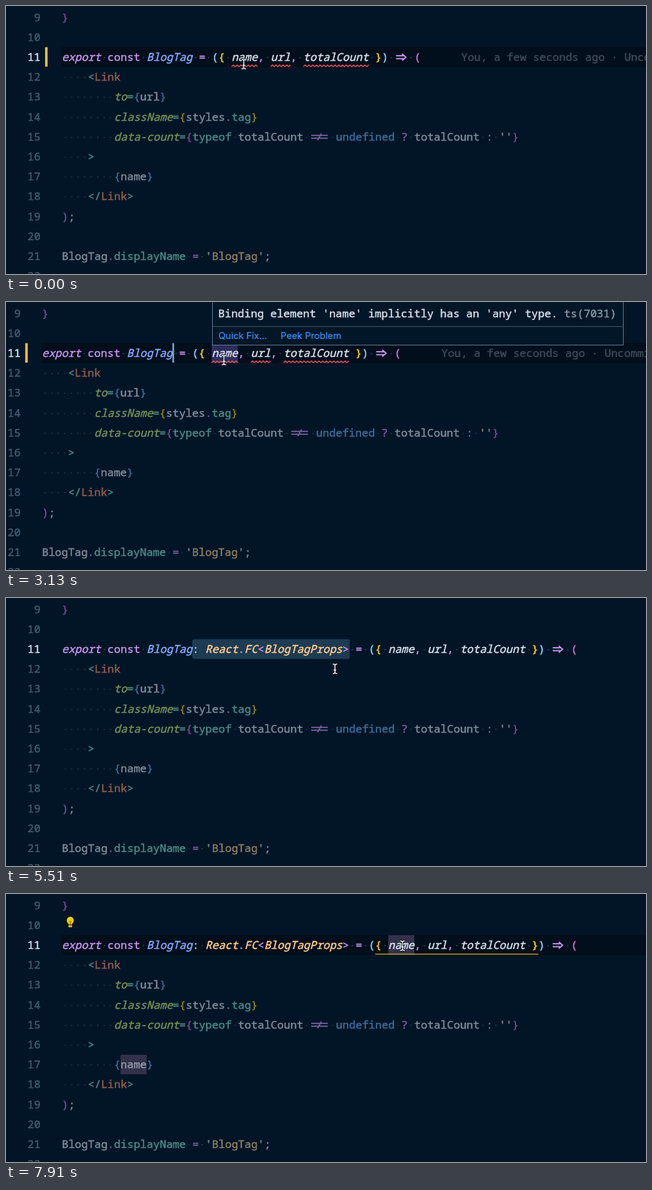
These frames come from a looping animation (1000x420 px, 8 s). An HTML page:

```html
<!DOCTYPE html>
<html lang="en">
<head>
<meta charset="utf-8">
<title>Typed component in an editor</title>
<style>
html, body { margin: 0; width: 100%; height: 100%; overflow: hidden; background: #011526; }
svg { display: block; width: 100vw; height: 100vh; }
text { font: 500 17px "Noto Sans Mono", "DejaVu Sans Mono", monospace; white-space: pre; stroke-width: 0.5; }
.it { font-style: italic; }
.ui { font: 400 14.5px Inter, Roboto, sans-serif; stroke-width: 0.2; }
.thin { stroke-width: 0.2; }
</style>
</head>
<body>
<svg id="stage" viewBox="0 0 1000 420"></svg>
<script>
const NS = 'http://www.w3.org/2000/svg';
const LOOP = 8000, CW = 10.2, LH = 31.2, X0 = 87.2;
const stage = document.getElementById('stage');

// Token keys: a capital letter means italic.
const colors = {
  k: '#c792ea', b: '#82aaff', w: '#d6deeb', y: '#ffd700', c: '#87d3ff', m: '#da70d6',
  t: '#7fdbca', g: '#c5e478', o: '#ffcb8b', r: '#f78c6c', s: '#ecc48d', u: '#6ea8e8'
};

const colX = col => X0 + col * CW;
const baseline = line => 86 + (line - 11) * LH;

function add(parent, tag, attrs = {}, text) {
  const el = document.createElementNS(NS, tag);
  for (const key in attrs) el.setAttribute(key, attrs[key]);
  if (text) el.textContent = text;
  parent.appendChild(el);
  return el;
}
const group = (parent, attrs) => add(parent, 'g', attrs);
const rect = (parent, x, y, width, height, fill, more) =>
  add(parent, 'rect', { x, y, width, height, fill, ...more });
const label = (parent, x, y, fill, text, more) =>
  add(parent, 'text', { x, y, fill, stroke: fill, ...more }, text);

function ligature(parent, x, y, kind, stroke) {
  const d = kind === '=>'
    ? `M${x + 2} ${y - 8}h12M${x + 2} ${y - 3.5}h12M${x + 11.5} ${y - 11}l6 5.2l-6 5.2`
    : `M${x + 2} ${y - 8}h26M${x + 2} ${y - 3.5}h26M${x + 18} ${y - 11}l-6 10.5`;
  add(parent, 'path', { d, stroke, fill: 'none', 'stroke-width': 2 });
}

// Lays tokens on the character grid; spaces become faint dots.
function code(parent, x, y, tokens, dot) {
  for (const token of tokens) {
    const key = token[0], text = token.slice(1), low = key.toLowerCase();
    if (key === ' ') {
      if (dot) label(parent, x, y, dot, '·'.repeat(text.length + 1), { class: 'thin' });
      x += (text.length + 1) * CW;
      continue;
    }
    if (text === '=>' || text === '!==') ligature(parent, x, y, text, colors[low]);
    else label(parent, x, y, colors[low], text, key === low ? {} : { class: 'it' });
    x += text.length * CW;
  }
  return x;
}

function squiggle(parent, col, len) {
  let d = `M${colX(col)} 95`;
  const steps = Math.round(len * CW / 2.9);
  for (let i = 0; i < steps; i++) d += `l${len * CW / steps} ${i % 2 ? 2.6 : -2.6}`;
  add(parent, 'path', { d, fill: 'none', stroke: '#ef5350', 'stroke-width': 1.5 });
}

const spaces = n => ' '.repeat(n);
const page = group(stage);

// Backgrounds
const lineBg = rect(page, 87, 64.5, 960, 31, '#010e1b');
const selection = rect(page, 291, 64.5, 246, 31, '#1d3b53', { rx: 3 });
const hoverPlain = rect(page, colX(26), 64.5, 4 * CW, 31, '#2d2d5d');
const hoverTyped = rect(page, colX(50), 64.5, 4 * CW, 31, '#2d2d5d');
const wordMarks = group(page);
rect(wordMarks, colX(50), 64.5, 4 * CW, 31, '#333149');
rect(wordMarks, colX(9), 252, 4 * CW, 30.5, '#333149');

// Line numbers
for (let n = 9; n <= 22; n++) {
  label(page, 54, baseline(n), n === 11 ? '#d5e6f5' : '#435a6e', n, { 'text-anchor': 'end' });
}

// Dimmed lines
const dimLines = {
  9: ['m}'],
  12: [spaces(4), 't<', 'rLink'],
  13: [spaces(8), 'Gto', 't=', 'u{', 'wurl', 'u}'],
  14: [spaces(8), 'GclassName', 't=', 'y{', 'wstyles', 'k.', 'ttag', 'y}'],
  15: [spaces(8), 'Gdata-count', 't=', 'm{', 'ttypeof', ' ', 'wtotalCount', ' ', 'k!==', ' ',
    'uundefined', ' ', 'k?', ' ', 'wtotalCount', ' ', 'k:', ' ', "w''", 'm}'],
  16: [spaces(4), 't>'],
  17: [spaces(8), 'u{', 'wname', 'u}'],
  18: [spaces(4), 't</', 'rLink', 't>'],
  19: ['m)', 'w;'],
  21: ['wBlogTag', 'k.', 'tdisplayName', ' ', 'k=', ' ', "w'", 'sBlogTag', "w'", 'w;']
};
const dim = group(page, { opacity: 0.58 });
for (const n in dimLines) code(dim, X0, baseline(+n), dimLines[n], '#28475f');

// Active line, without and with the type annotation
const head = ['Kexport', ' ', 'kconst', ' ', 'BBlogTag'];
const type = ['t:', ' ', 'OReact', 'k.', 'OFC', 'k<', 'OBlogTagProps', 'k>'];
const tail = [' ', 'k=', ' ', 'c(', 'y{', ' ', 'Wname', 'k,', ' ', 'Wurl', 'k,', ' ',
  'WtotalCount', ' ', 'y}', 'c)', ' ', 'k=>', ' ', 'm('];

function activeLine(tokens, shift) {
  const all = group(page);
  const end = code(all, X0, 86, tokens, '#25425a');
  const errors = group(all);
  squiggle(errors, 26 + shift, 4);
  squiggle(errors, 32 + shift, 3);
  squiggle(errors, 37 + shift, 10);
  const blame = label(all, end + 63, 86, '#3a4b59', 'You, a few seconds ago · Uncommitted changes');
  return { all, errors, blame };
}
const plain = activeLine([...head, ...tail], 0);
const typed = activeLine([...head, ...type, ...tail], 24);

const hint = rect(page, colX(48), 93.6, 25 * CW, 1.4, '#c9a90a');
const bar = rect(page, 61, 64.5, 4, 30.5, '#e2b93d');
const caret = rect(page, 291, 64.5, 2.6, 30.5, '#80a4c2');

// Popups
const box = { stroke: '#5f7e97', 'stroke-width': 1 };
const problem = group(page);
rect(problem, 353.5, -3, 642, 70.5, '#011627', box);
rect(problem, 354, 38, 641, 1, '#41596c');
label(problem, 362.5, 23.5, '#d6deeb', "Binding element 'name' implicitly has an 'any' type.");
label(problem, 362.5 + 53 * CW, 23.5, '#8795a3', 'ts(7031)');
label(problem, 363, 58, '#3794ff', 'Quick Fix...', { class: 'ui' });
label(problem, 460, 58, '#3794ff', 'Peek Problem', { class: 'ui' });

const info = group(page);
rect(info, 598.5, 23.5, 185, 43, '#011627', box);
code(info, 609, 52, ['kvar', ' ', 'Wname', 't:', ' ', 'Gstring']);

// Light bulb
const bulb = group(page);
add(bulb, 'path', {
  d: 'M97.5 47.5C97 45.5 95 44.5 95 41a5.4 5.4 0 0 1 10.8 0c0 3.5-2 4.5-2.5 6.5z',
  fill: '#ffcc00'
});
add(bulb, 'path', { d: 'M98.5 42l1.9 2l1.9-2M100.4 44v3', fill: 'none', stroke: '#5a4a10' });
rect(bulb, 97.5, 48.5, 5.8, 3.8, '#d8b010', { rx: 1 });

// Pointer
const pointer = group(page);
const beam = 'M-3.5-7.5Q0-7.5 0-5.5Q0-7.5 3.5-7.5M0-5.5V5.5M-3.5 7.5Q0 7.5 0 5.5Q0 7.5 3.5 7.5M-2 2h4';
add(pointer, 'path', { d: beam, fill: 'none', stroke: '#06101a', 'stroke-width': 3.4 });
add(pointer, 'path', { d: beam, fill: 'none', stroke: '#f4f6f8', 'stroke-width': 1.5 });

const blinks = [290, 740, 1180, 1630, 2230, 2680, 3130, 4320, 4770, 5210, 5660, 6110, 6710, 7310];
const moves = [
  [0, 371.5, 91], [4920, 376, 97], [5070, 400, 132], [5210, 440, 160], [5360, 484, 146],
  [5510, 514, 111], [5660, 548, 100], [5810, 590, 86], [5960, 614, 81], [6110, 619.5, 81]
];
const show = (el, on) => el.setAttribute('visibility', on ? 'inherit' : 'hidden');

function draw(t) {
  const between = (a, b = LOOP) => t >= a && t < b;
  const hovering = between(140, 3730);
  page.setAttribute('transform', `translate(${hovering ? -31 : 0})`);
  show(problem, hovering);
  show(hoverPlain, hovering);

  show(plain.all, t < 3730);
  show(typed.all, t >= 3730);
  show(typed.errors, t < 4320);
  show(typed.blame, t < 3870);
  show(bar, t < 4020);

  show(selection, between(3730, 7310));
  show(lineBg, !between(3730, 7310));
  show(hoverTyped, between(6410, 7310));
  show(info, between(6410, 7310));
  show(hint, t >= 7460);
  show(wordMarks, t >= 7760);
  show(bulb, t >= 7910);

  show(caret, blinks.filter(b => b <= t).length % 2);
  const [, x, y] = moves.filter(m => m[0] <= t).pop();
  pointer.setAttribute('transform', `translate(${x} ${y})`);
}

function tick() {
  draw(performance.now() % LOOP);
  requestAnimationFrame(tick);
}
tick();
</script>
</body>
</html>
```
